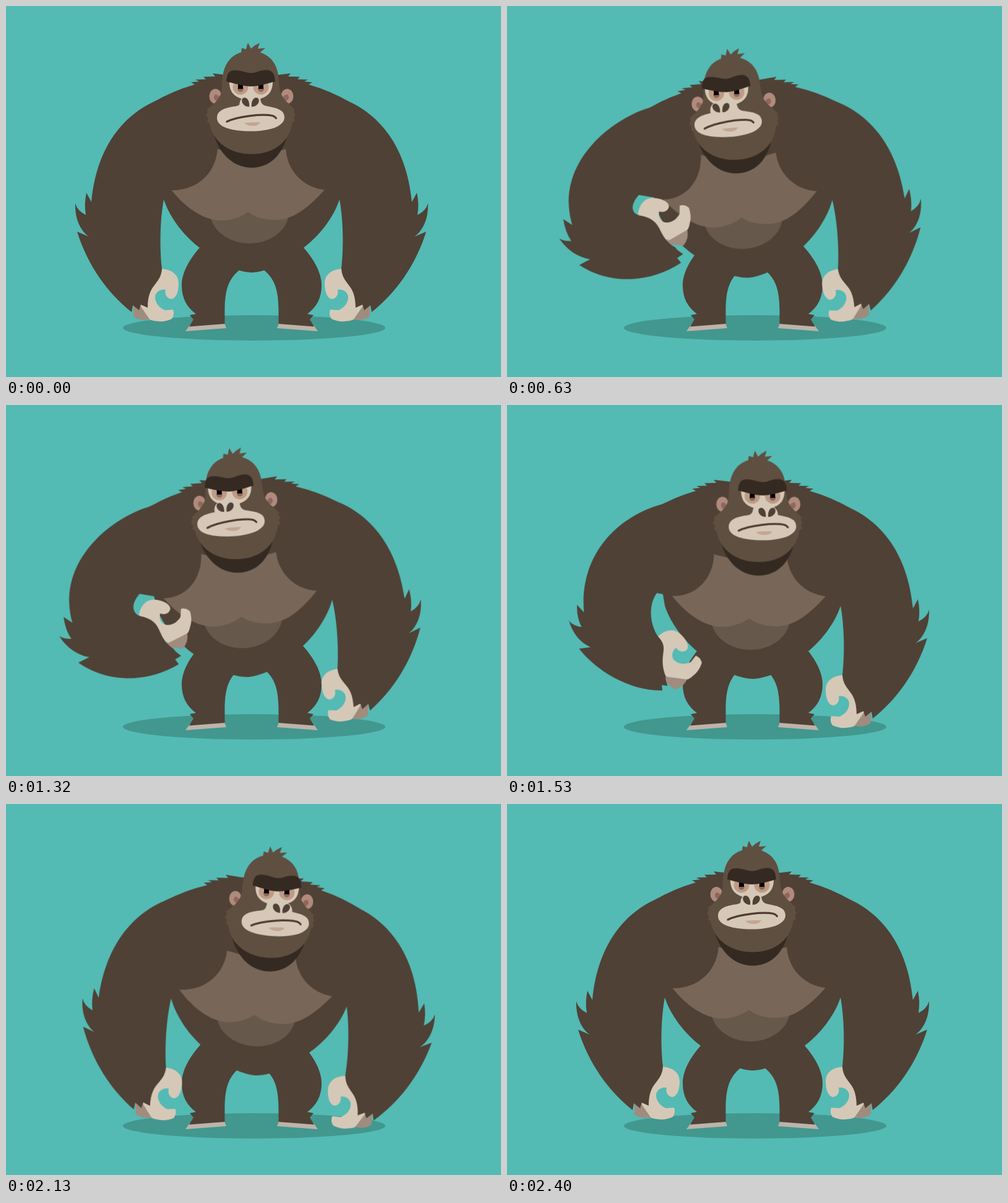
Write an HTML page that moves like this. It is 800x600 px and loops after 2730 ms.

```html
<!DOCTYPE html>
<html lang="en">
<head>
<meta charset="utf-8">
<title>Gorilla</title>
<style>
html, body { margin: 0; width: 100%; height: 100%; overflow: hidden; background: #54bab4; }
svg { display: block; width: 800px; height: 600px; }

:root {
  /* left arm: hanging, half bent, bent across the belly */
  --rest: path("M262 146 C196 166 147 222 138 317 L130 302 Q126 320 129 338 Q115 331 112 319 C111 345 121 364 134 373 L115 365 C132 420 165 465 203 495 L205 484 L215 492 L218 483 L229 488 C229 448 250 452 252 425 C248 390 249 345 255 313 L267 298 C310 299 342 268 342 226 C342 190 310 150 262 146 Z");
  --half: path("M262 146 C190 161 125 217 127 321 L117 308 Q115 328 123 344 Q108 341 102 332 C107 355 118 370 132 377 L113 377 C136 415 183 457 236 469 L237 460 L246 464 L245 452 L247 448 C240 405 262 405 252 380 C237 354 234 314 248 294 L267 297 C307 298 336 268 336 226 C336 190 310 150 262 146 Z");
  --bent: path("M262 146 C205 153 91 222 117 330 L103 320 Q105 341 114 356 Q102 356 95 351 C106 370 124 383 143 387 L125 395.5 C170 429 235 432.5 290 400 L284 392 L294 386 L285 379 L281 374 C250 353 268 329 225 319.5 C213 315 212 303 227 287.5 L270 297 C305 297 331 268 331 226 C331 190 310 150 262 146 Z");
}

.body, .head, .face, .nose, .nod, .arm, .hand, .scratch { animation: 2.73s linear infinite; }
.body { animation-name: lean; transform-origin: 391px 333px; }
.head { animation-name: head; }
.face, .nose { animation-name: turn; }
.nod { animation-name: nod; }
.arm { animation-name: arm; d: var(--rest); }
.hand { animation-name: hand; transform-origin: 252px 425px; }
.scratch { animation-name: scratch; transform-origin: 252px 425px; }
.still { d: var(--rest); }

.fur { fill: #4f4135; }
.coat { fill: #5f4f41; }
.dark { fill: #342a22; }
.skin { fill: #d6c8b7; }
.tan { fill: #bd9b85; }

@keyframes lean {
  0%, 87.912%, 100% { transform: translate(0, 0) rotate(0deg); }
  5.495% { transform: translate(0, 0) rotate(0deg); animation-timing-function: cubic-bezier(.4, .1, .7, .7); }
  10.989% { transform: translate(-6px, 4px) rotate(-1.4deg); animation-timing-function: cubic-bezier(.25, .5, .4, 1); }
  25.275% { transform: translate(-12px, 9px) rotate(-3.2deg); }
  45.055% { transform: translate(-12px, 9px) rotate(-3.2deg); animation-timing-function: cubic-bezier(.45, 0, .75, .75); }
  56.044% { transform: translate(0, 12px) rotate(0deg); animation-timing-function: cubic-bezier(.3, .4, .5, 1); }
  61.538% { transform: translate(11px, 8px) rotate(2.7deg); }
  76.923% { transform: translate(11px, 8px) rotate(2.7deg); animation-timing-function: ease-in-out; }
}
@keyframes head {
  0%, 87.912%, 100% { transform: translate(0, 0); }
  5.495% { transform: translate(0, 0); animation-timing-function: cubic-bezier(.4, .1, .7, .7); }
  10.989% { transform: translate(-4.7px, 0); animation-timing-function: cubic-bezier(.25, .5, .4, 1); }
  25.275% { transform: translate(-8px, 0); }
  45.055% { transform: translate(-8px, 0); animation-timing-function: cubic-bezier(.45, 0, .75, .75); }
  56.044% { transform: translate(9.5px, 2.5px); animation-timing-function: cubic-bezier(.3, .4, .5, 1); }
  61.538% { transform: translate(13px, .5px); }
  76.923% { transform: translate(13px, .5px); animation-timing-function: ease-in-out; }
}
@keyframes turn {
  0%, 87.912%, 100% { transform: translate(0, 0); }
  5.495% { transform: translate(0, 0); animation-timing-function: cubic-bezier(.4, .1, .7, .7); }
  10.989% { transform: translate(-5px, .5px); animation-timing-function: cubic-bezier(.25, .5, .4, 1); }
  25.275% { transform: translate(-9.7px, -.7px); }
  45.055% { transform: translate(-9.7px, -.7px); animation-timing-function: cubic-bezier(.45, 0, .75, .75); }
  56.044% { transform: translate(7.7px, 1.8px); animation-timing-function: cubic-bezier(.3, .4, .5, 1); }
  61.538% { transform: translate(9.5px, 1.6px); }
  76.923% { transform: translate(9.5px, 1.6px); animation-timing-function: ease-in-out; }
}
@keyframes arm {
  0%, 61.538%, 100% { d: var(--rest); }
  5.495% { d: var(--rest); animation-timing-function: cubic-bezier(.4, .1, .7, .7); }
  10.989% { d: var(--half); animation-timing-function: cubic-bezier(.25, .5, .4, 1); }
  25.275% { d: var(--bent); }
  45.055% { d: var(--bent); animation-timing-function: cubic-bezier(.5, 0, .9, .85); }
  58.242% { d: var(--half); animation-timing-function: cubic-bezier(.3, .5, .6, 1); }
}
@keyframes hand {
  0%, 61.538%, 100% { transform: translate(0, 0) rotate(0deg); }
  5.495% { transform: translate(0, 0) rotate(0deg); animation-timing-function: cubic-bezier(.4, .1, .7, .7); }
  10.989% { transform: translate(0, -45px) rotate(-34deg); animation-timing-function: cubic-bezier(.25, .5, .4, 1); }
  25.275% { transform: translate(-28px, -108.5px) rotate(-82.8deg); }
  45.055% { transform: translate(-28px, -108.5px) rotate(-82.8deg); animation-timing-function: cubic-bezier(.5, 0, .9, .85); }
  58.242% { transform: translate(0, -45px) rotate(-34deg); animation-timing-function: cubic-bezier(.3, .5, .6, 1); }
}
@keyframes scratch {
  0%, 25.275%, 36.264%, 45.055%, 100% { transform: rotate(0deg); animation-timing-function: ease-in-out; }
  30.769%, 40.659% { transform: rotate(-6deg); animation-timing-function: ease-in-out; }
}
@keyframes nod {
  0%, 25.275%, 36.264%, 45.055%, 100% { transform: translate(0, 0); animation-timing-function: ease-in-out; }
  30.769%, 40.659% { transform: translate(0, 1.5px); animation-timing-function: ease-in-out; }
}
</style>
</head>
<body>
<svg viewBox="0 0 800 600">
  <defs>
    <g id="leg">
      <path fill="#bdb3a9" d="M290 526 L297 516 L353 513 L356 521 Z"/>
      <path class="fur" d="M322 381 C292 412 284 435 284 452 C284 472 292 487 307 498 L297 500 L303 507 L296 518.5 L353.5 514 V490 C354 458 360 442 376 428 L395 405 Z"/>
    </g>
    <path id="trunk" class="fur" d="M239 155 Q270 137 305 127 L299 123.5 L312 122 L306 119 L323 118.5 L319 114.5 L338 114 L334 109 L360 112 H399 V431 C372 431 338 413 313 391 C288 372 265 343 255 313 L252 295 L239 230 Z"/>
    <g id="paw">
      <path fill="#a08c7e" d="M206 476 L220 478 L234 506 Q218 511 206 502 Z"/>
      <path class="skin" d="M252 425 C266 426 279 433 279 449 C279 462 275 473 267 474 C260 473 256 466 258 459 C250 457 241 463 241 471 C241 481 249 489 257 492 L270 491 Q273 499 268 506 Q258 511 246 510 C236 509 233 508 231 505 L213 479 L216 462 L240 430 Z"/>
    </g>
    <g id="ear">
      <ellipse cx="338.5" cy="146" rx="10" ry="12" fill="#b08a7d"/>
      <path fill="#8f675b" d="M338 143 C334 148 336 153 345 155 L347 151 Q344 143 338 143 Z"/>
    </g>
    <g id="eye">
      <circle class="tan" cx="379" cy="131" r="12.5"/>
      <circle cx="379" cy="134" r="4.8" fill="#8f6659"/>
      <path d="M375 127 H383 V134 H375 Z"/>
    </g>
    <path id="nostril" class="fur" d="M384 148.5 C378 151 382 163 393 163 C394 156 391 147 384 148.5 Z"/>
  </defs>

  <rect width="800" height="600" fill="#54bab4"/>
  <ellipse cx="401" cy="520.5" rx="212" ry="20.5" fill="#42978f"/>
  <use href="#leg"/>
  <use href="#leg" transform="translate(794) scale(-1 1)"/>

  <g class="body">
    <use href="#trunk"/>
    <use href="#trunk" transform="translate(794) scale(-1 1)"/>
    <ellipse cx="393.5" cy="332" rx="64" ry="52" fill="#66594b"/>
    <path fill="#786658" d="M320 226 L397 245 L474 226 L515 297 C490 325 465 346 435 346 C416 346 402 341 391 333 C380 341 365 347 345 347 C312 345 282 317 267 297 Z"/>

    <g transform="translate(794) scale(-1 1)">
      <use href="#paw"/>
      <path class="fur still"/>
    </g>
    <g class="hand"><g class="scratch"><use href="#paw"/></g></g>
    <path class="fur arm"/>

    <g class="head"><g class="nod">
      <path class="dark" d="M333 196 C340 235 365 261.5 397 261.5 C430 261.5 452 235 457 196 Z"/>
      <use href="#ear"/>
      <use href="#ear" transform="translate(793) scale(-1 1)"/>
      <path class="coat" d="M380 75 L381 68 L388 70 Q389 64 391 59.5 L396 69 Q402 63 410 59.5 L407 69 L419 68 L411 75 C430 82 440 96 441 122 C442 140 446 148 456 157 L467 168 L465 171 L468 177 L465 179 L467 186 L463 188 C458 222 430 239.5 397 239.5 C364 239.5 335 222 329 190 L325 187 L327 181 L323 178 L326 171 L324 168 Q340 157 346 145 C350 136 348 128 350 115 C353 92 365 79 380 75 Z"/>
      <g class="face">
        <path class="skin" d="M361 119 C360 138 368 146 381 150 C379 156 380 160 372 162 C356 164 341 168 341 181 C341 196 365 202.500 396 202.500 C425 202.500 450 195 450 180 C450 168 438 165 422 162 C413 160 412 156 411 150 C424 146 432 138 431 119 Z"/>
        <use href="#eye"/>
        <use href="#eye" transform="translate(791) scale(-1 1)"/>
        <path class="dark" d="M356 122 C357 108 361 104 370 104 C382 104 388 108.5 396 108.5 C404 108.5 410 103.5 421 103.5 C430 104 434 108 435 122 C420 126 408 130 396 130 C384 130 372 126 356 122 Z"/>
        <g class="nose">
          <path class="skin" d="M386 146 C375 151 375 165 383 172 H407 C415 165 415 151 404 146 Z"/>
          <use href="#nostril"/>
          <use href="#nostril" transform="translate(790) scale(-1 1)"/>
        </g>
        <path fill="none" stroke="#4f3b30" stroke-width="3.2" stroke-linecap="round" d="M357 187 C375 178 415 174 431 177.5 Q435 179 436.5 181.5"/>
        <path fill="#c3a690" d="M385 189 Q398 187.5 411 188 Q408 194 399 194 Q389 194 385 189 Z"/>
      </g>
    </g></g>
  </g>
</svg>
</body>
</html>
```
